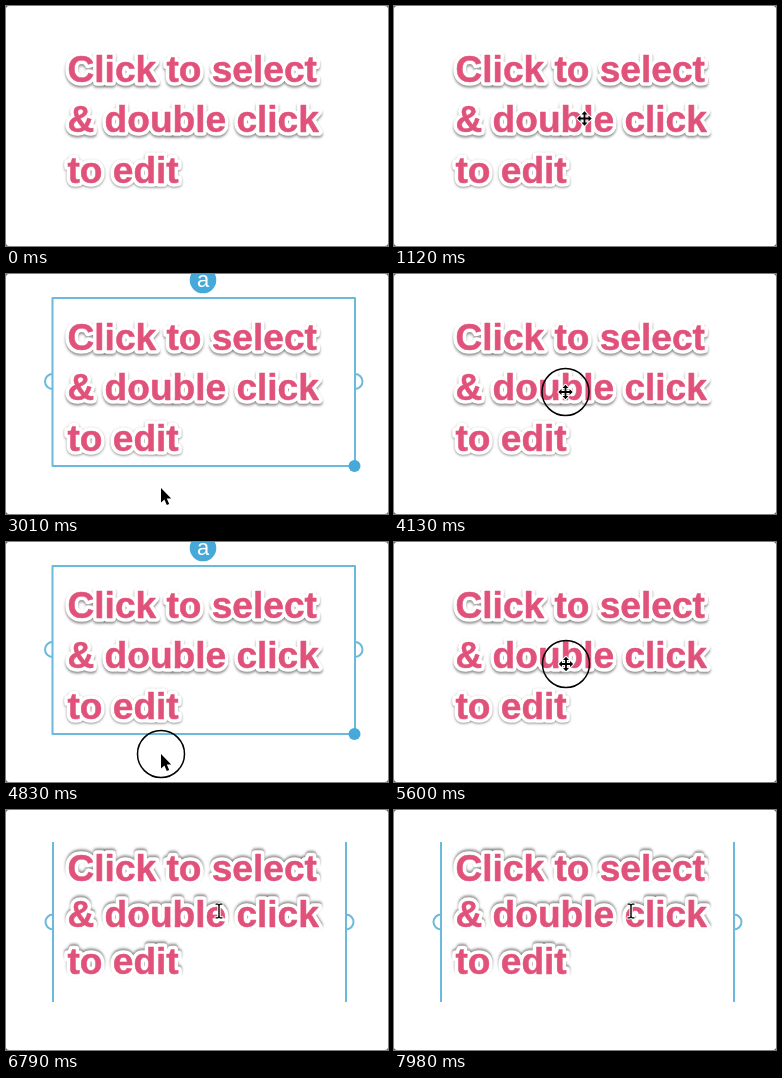
An HTML page with a canvas for the animation above (8 s loop, 382 by 240 pixels).

```html
<!DOCTYPE html>
<html lang="en">
<head>
<meta charset="utf-8">
<title>Click to select</title>
<style>
  html, body { margin: 0; width: 100%; height: 100%; overflow: hidden; background: #fff; }
  canvas { display: block; width: 382px; height: 240px; }
</style>
</head>
<body>
<canvas id="stage" width="382" height="240"></canvas>
<script>
const W = 382, H = 240, LOOP = 8000, STEP = 70;
const PINK = '#e1527b', BLUE = '#46a9d9', LINE = '#6bb9dc';
const LINES = ['Click to select', '& double click', 'to edit'];
const ctx = document.getElementById('stage').getContext('2d');

// Pointer stops: time, x, y
const STOPS = [
  [210, -8, 238], [1050, 190.5, 112.5], [1960, 190.5, 112.5],
  [2730, 155, 214], [3290, 155, 214], [3920, 171.5, 118], [4340, 171.5, 118],
  [4760, 155, 212], [5000, 155, 212], [5460, 172, 122], [6020, 172, 122],
  [6790, 213, 101], [6900, 213, 101], [7210, 237, 101], [LOOP, 237, 101]
];
const PRESSES = [[1680, 1960], [3080, 3290], [4060, 4270], [4830, 5000], [5530, 5740], [7210, 7350]];
const SELECTED = [[1750, 3150], [4200, 4900], [5670, 5810]];
const EDIT_AT = 5810;

const during = (spans, t) => spans.some(([a, b]) => t >= a && t < b);
const ease = p => p * p * (3 - 2 * p);

function pointerAt(t) {
  const i = STOPS.findIndex(s => s[0] > t);
  if (i < 1) return null;
  const [t0, x0, y0] = STOPS[i - 1], [t1, x1, y1] = STOPS[i];
  const p = ease((t - t0) / (t1 - t0));
  return { x: x0 + (x1 - x0) * p, y: y0 + (y1 - y0) * p };
}

function disc(x, y, r, color) {
  ctx.fillStyle = color;
  ctx.beginPath();
  ctx.arc(x, y, r, 0, Math.PI * 2);
  ctx.fill();
}

function drawPaper() {
  ctx.fillStyle = '#555';
  ctx.fillRect(0, 0, W, H);
  ctx.fillStyle = '#fff';
  ctx.beginPath();
  ctx.roundRect(0, 0, W, H, 3);
  ctx.fill();
}

function drawText(editing) {
  const left = 61.5, top = editing ? 71 : 76.2, gap = editing ? 46.3 : 50.2;
  ctx.font = 'bold 37.1px "Liberation Sans", Arial, sans-serif';
  ctx.textAlign = 'left';
  ctx.lineJoin = 'round';
  LINES.forEach((line, i) => {
    const y = top + gap * i;
    ctx.save();
    ctx.shadowColor = 'rgba(0,0,0,.42)';
    ctx.shadowBlur = 2.5;
    ctx.shadowOffsetY = editing ? -2 : 1.3;
    ctx.strokeStyle = '#fff';
    ctx.lineWidth = 7.5;
    ctx.strokeText(line, left, y);
    ctx.restore();
    ctx.fillStyle = ctx.strokeStyle = PINK;
    ctx.lineWidth = 0.5;
    ctx.fillText(line, left, y);
    ctx.strokeText(line, left, y);
  });
}

// Half-round grip on the outer side of a vertical edge
function grip(x, y, side) {
  ctx.fillStyle = '#fff';
  ctx.beginPath();
  ctx.arc(x, y, 7.5, -Math.PI / 2, Math.PI / 2, side < 0);
  ctx.fill();
  ctx.stroke();
}

function drawFrame(editing) {
  const left = editing ? 47 : 46.5, right = editing ? 340 : 349;
  const top = editing ? 32 : 24, bottom = 192, mid = editing ? 112 : 107.5;
  ctx.strokeStyle = LINE;
  ctx.lineWidth = 2;
  grip(left, mid, -1);
  grip(right, mid, 1);
  ctx.beginPath();
  if (editing) {
    for (const x of [left, right]) {
      ctx.moveTo(x, top);
      ctx.lineTo(x, bottom);
    }
  } else {
    ctx.rect(left, top, right - left, bottom - top);
  }
  ctx.stroke();
  if (editing) return;
  disc(348.5, 192, 6, BLUE);
  disc(197, 6, 13.3, BLUE);
  ctx.fillStyle = '#fff';
  ctx.font = '22px "Liberation Sans", Arial, sans-serif';
  ctx.textAlign = 'center';
  ctx.fillText('a', 197, 12.5);
}

function drawCaret(t) {
  if (t < 7280) return;
  ctx.globalAlpha = t < 7910 ? 1 : t < 7980 ? 0.5 : 0;
  ctx.fillStyle = PINK;
  ctx.fillRect(233, 82, 2, 44);
  ctx.globalAlpha = 1;
}

function outlined(path, halo) {
  ctx.lineJoin = 'round';
  ctx.strokeStyle = '#fff';
  ctx.lineWidth = halo;
  ctx.stroke(path);
  ctx.fillStyle = '#000';
  ctx.fill(path);
}

const arrow = new Path2D('M0 0V14.5L3.4 11.4L5.8 17L8.2 16L5.8 10.5H10.2Z');

const move = new Path2D();
const spoke = new Path2D('M0 -7.2L3 -4H.9V0H-.9V-4H-3Z');
for (let a = 0; a < 360; a += 90) move.addPath(spoke, new DOMMatrix().rotate(a));

const beam = new Path2D('M-3.5 -7.5H-1L0 -6.7L1 -7.5H3.5V-6.3H1.4L.7 -5.6V5.6L1.4 6.3H3.5V7.5H1L0 6.7L-1 7.5H-3.5V6.3H-1.4L-.7 5.6V-5.6L-1.4 -6.3H-3.5Z');

function drawPointer(t, editing) {
  const p = pointerAt(t);
  if (!p) return;
  const over = p.x > 46 && p.x < 349 && p.y > 24 && p.y < 192;
  ctx.save();
  ctx.translate(p.x, p.y);
  if (during(PRESSES, t)) {
    ctx.strokeStyle = '#000';
    ctx.lineWidth = 1.5;
    ctx.beginPath();
    ctx.arc(0, 0, 23.5, 0, Math.PI * 2);
    ctx.stroke();
  }
  outlined(editing ? beam : over ? move : arrow, 2);
  ctx.restore();
}

function draw(t) {
  const editing = t >= EDIT_AT;
  drawPaper();
  if (editing || during(SELECTED, t)) drawFrame(editing);
  drawText(editing);
  if (editing) drawCaret(t);
  drawPointer(t, editing);
}

const start = performance.now();
function tick() {
  const t = (performance.now() - start) % LOOP;
  draw(Math.floor(t / STEP) * STEP);
  requestAnimationFrame(tick);
}
tick();
</script>
</body>
</html>
```
